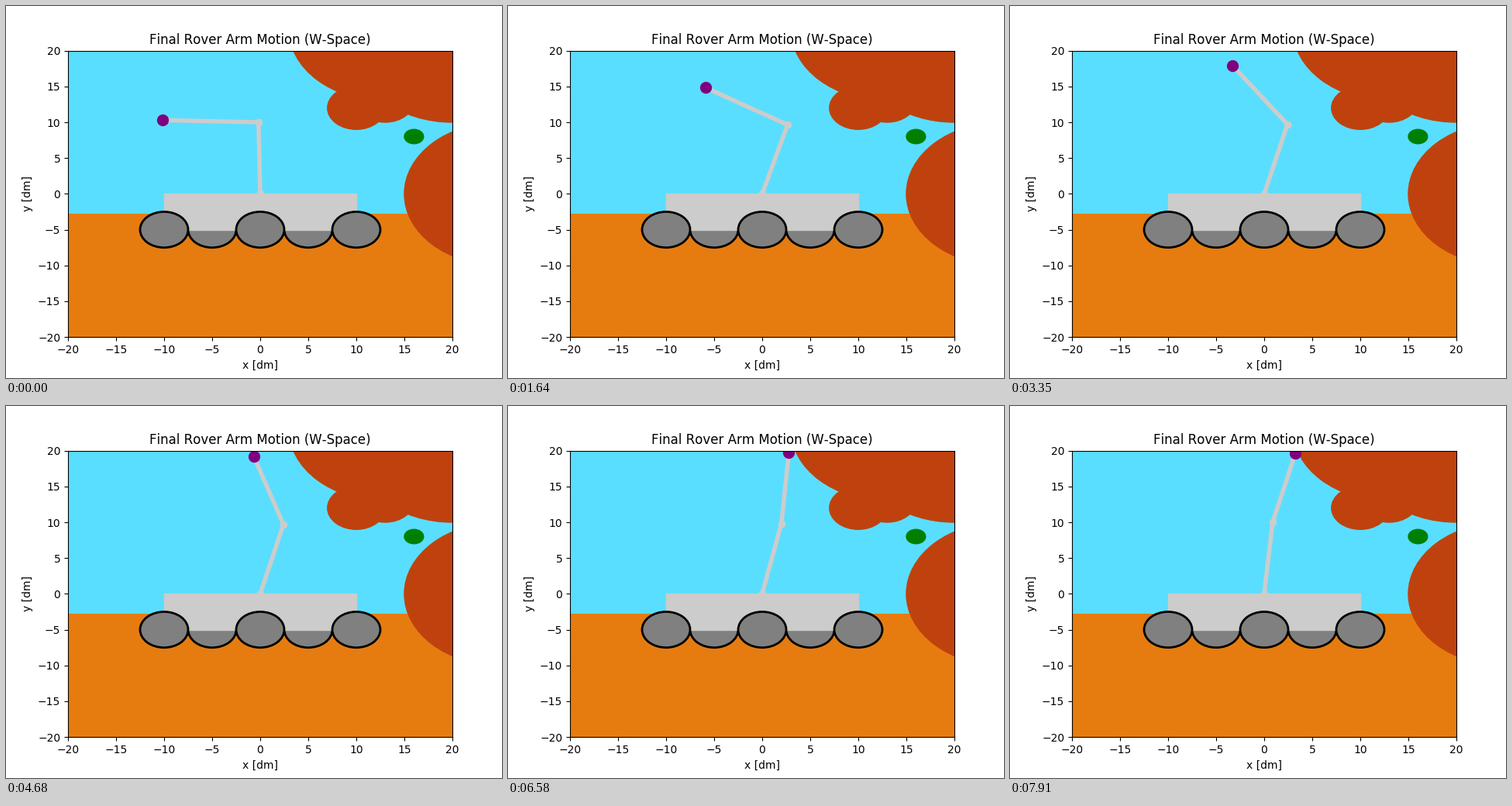
These frames come from a looping animation (640x480 px, 8 s). A matplotlib script:

```python
import numpy as np
import matplotlib.pyplot as plt
from matplotlib.animation import FuncAnimation
from matplotlib.patches import Circle, Rectangle

plt.rcParams["text.kerning_factor"] = 6

LOOP, TICK = 8000, 20
LINK = 10
SKY, SAND, ROCK, METAL = "#5adeff", "#e67c0f", "#bf420e", "#cccccc"

# Waypoints in joint space: step, shoulder angle, elbow angle (degrees)
PATH = [(0, 91, 87.3), (18, 74.7, 74), (36, 76, 48.8), (40, 79, 44),
        (50, 76, 32), (58, 71.8, 22.2), (70, 78.5, 7), (84, 85, -8.8)]
steps, shoulder, elbow = zip(*PATH)

fig, ax = plt.subplots(figsize=(6.4, 4.8), dpi=100)
ax.set(xlim=(-20, 20), ylim=(-20, 20), xlabel="x [dm]", ylabel="y [dm]",
       title="Final Rover Arm Motion (W-Space)")
ax.set_xticks(range(-20, 21, 5))
ax.set_yticks(range(-20, 21, 5))


def disc(x, y, r, color):
    ax.add_patch(Circle((x, y), r, color=color))


def wheel(x):
    ax.add_patch(Circle((x, -5), 2.5, fc="gray", ec="black", lw=2))


# Landscape
ax.set_facecolor(SKY)
ax.add_patch(Rectangle((-20, -20), 40, 17.25, fc=SAND, lw=0))
disc(13, 23, 10, ROCK)
disc(20, 20, 10, ROCK)
disc(25, 0, 10, ROCK)
disc(10, 12, 3, ROCK)
disc(13, 13, 3, ROCK)
disc(16, 8, 1, "green")

# Rover: rear wheels, body, front wheels
for x in (-5, 5):
    wheel(x)
ax.add_patch(Rectangle((-10, -5), 20, 5, color=METAL))
for x in (-10, 0, 10):
    wheel(x)

arm, = ax.plot([], [], "o-", color=METAL, lw=4)
hand, = ax.plot([], [], "o", color="purple", ms=10)


def step_at(ms):
    """Each 190 ms holds one step for 60 ms and the next for 130 ms."""
    cycle, rest = divmod(ms - 60, 190)
    return max(0, 2 * cycle + (1 if rest < 60 else 2))


def update(i):
    step = step_at(i * TICK + TICK // 2)
    a = np.radians(np.interp(step, steps, shoulder))
    b = a + np.radians(np.interp(step, steps, elbow))
    xs = LINK * np.cumsum([0, np.cos(a), np.cos(b)])
    ys = LINK * np.cumsum([0, np.sin(a), np.sin(b)])
    arm.set_data(xs, ys)
    hand.set_data(xs[-1:], ys[-1:])
    return arm, hand


anim = FuncAnimation(fig, update, frames=LOOP // TICK, interval=TICK,
                     repeat=True, repeat_delay=0)
plt.show()
```
